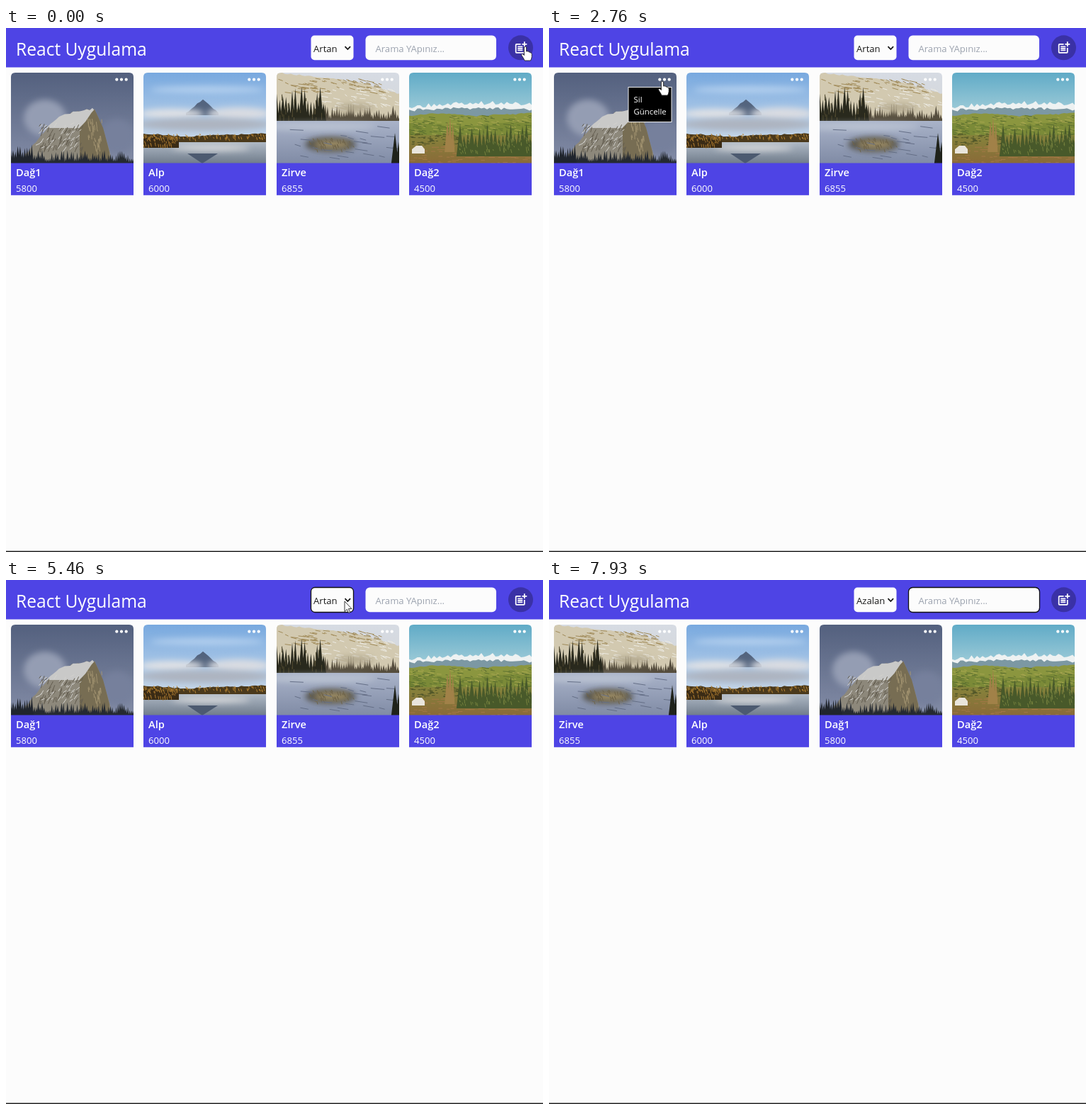
An HTML page for the animation above (8 s loop, 758 by 739 pixels).

```html
<!DOCTYPE html>
<html lang="tr">
<head>
<meta charset="utf-8">
<title>React Uygulama</title>
<style>
  html, body { margin: 0; width: 100%; height: 100%; overflow: hidden; background: #fcfcfc; }
  svg { display: block; width: 758px; height: 739px; }
  text { font: 13.1px "Open Sans", "Noto Sans", sans-serif; fill: #fff; }
  .h1 { font-size: 24.6px; }
  .h2 { font-size: 19.3px; }
  .name { font-size: 14.6px; font-weight: 600; }
  .small { font-size: 11.4px; }
  .dark { fill: #1a1a1a; }
  .hint { fill: #9ca3af; }
  .brand { fill: #4e44e5; }
  .ring { fill: none; stroke: #101010; stroke-width: 1.3; }
  .field { fill: #fcfcfc; stroke: #e5e7eb; }
  .cursor { fill: #fff; stroke: #222; stroke-width: .9; stroke-linejoin: round; }
</style>
</head>
<body>
<svg viewBox="0 0 758 739">
  <defs>
    <clipPath id="photo"><path d="M0 128V6Q0 0 6 0H167Q173 0 173 6V128Z"/></clipPath>
    <filter id="soft" x="-50%" y="-50%" width="200%" height="200%"><feGaussianBlur stdDeviation="7"/></filter>
    <filter id="haze" x="-50%" y="-90%" width="200%" height="280%"><feGaussianBlur stdDeviation="4"/></filter>
    <g id="menu">
      <rect x="105" y="20.5" width="61" height="49" stroke="#eee"/>
      <text class="small" x="112.500" y="41.500">Sil</text>
      <text class="small" x="112.500" y="59">Güncelle</text>
    </g>
  </defs>

  <rect width="758" height="55.500" class="brand"/>
  <rect y="737.500" width="758" height="1.500" fill="#222"/>
  <text class="h1" x="14" y="38.500">React Uygulama</text>

  <rect x="430.500" y="10.500" width="60" height="34.700" rx="5" fill="#fcfcfc"/>
  <text id="order" class="dark" x="434" y="33.500"></text>
  <path d="M478.500 26.200L482.300 30L486.100 26.200" fill="none" stroke="#111" stroke-width="1.700"/>
  <rect id="selectRing" class="ring" x="430.500" y="10.500" width="60" height="35" rx="5.500"/>

  <rect x="507.500" y="10.500" width="184.500" height="34.700" rx="6" fill="#fcfcfc"/>
  <text class="hint" x="521.500" y="33.500">Arama YApınız...</text>
  <rect id="searchRing" class="ring" x="507.500" y="10.500" width="185" height="35" rx="6"/>
  <rect id="caret" x="521" y="20" width="1" height="17" fill="#111"/>

  <circle cx="726.500" cy="27.800" r="17.500" fill="#3a31a6"/>
  <path transform="translate(716.2 17.600) scale(.867)" fill="#fff"
    d="M17 19H5V7h7V5H5q-2 0-2 2v12q0 2 2 2h12q2 0 2-2v-7h-2zM19 2h-2v3h-3v2h3v3h2V7h3V5h-3zM7 9h8v2H7zM7 12h8v2H7zM7 15h8v2H7z"/>

  <g id="cards"></g>

  <g id="modal">
    <rect x="254" y="258" width="249" height="250" rx="6" opacity=".13" filter="url(#soft)"/>
    <rect x="252" y="248" width="253.500" height="252" rx="6" fill="#fcfcfc"/>
    <text class="h2 dark" x="266.500" y="285">Ürün Oluştur</text>
    <path d="M473 268.500L489.500 285M489.500 268.500L473 285" stroke="#111" stroke-width="2.200"/>
    <path d="M266.500 301.500H491.500" stroke="#e5e7eb"/>
    <rect class="field" x="266.500" y="312.300" width="225" height="34.500" rx="5"/>
    <rect class="field" x="266.500" y="357.300" width="225" height="34.500" rx="5"/>
    <rect class="field" x="266.500" y="402.300" width="225" height="34.500" rx="5"/>
    <text class="hint" x="274" y="335.500">Ürün Ekle</text>
    <text class="hint" x="274" y="380.800">Fiyat Ekle</text>
    <rect x="274" y="410" width="75.500" height="25.500" rx="2" fill="#efefef" stroke="#767676"/>
    <text class="dark" x="280.500" y="428">Dosya Seç</text>
    <text class="dark" x="353.500" y="428">Dosya seçilmedi</text>
    <rect class="brand" x="266.500" y="450.700" width="225" height="34.700" rx="5"/>
    <text x="379" y="473.500" text-anchor="middle">Ürün Oluştur</text>
  </g>

  <path id="arrow" class="cursor" d="M0 0V14.500L3.300 11.400L5.600 16.400L7.700 15.500L5.500 10.600H10Z"/>
  <path id="hand" class="cursor" d="M-1.600 1Q0 -1 1.600 1V7Q5 6 5.200 8Q7 7.500 7.400 9Q9 9 9.200 10.500V14.500Q9 17 7.500 20H-1Q-2 17 -5 13Q-6 11 -4.500 10.500Q-3 10.500 -1.600 12.500Z"/>
</svg>

<script>
const $ = id => document.getElementById(id);

let seed = 7;
const rnd = () => (seed = seed * 16807 % 2147483647) / 2147483647;

// Vertical gradient from `y` down to the photo's lower edge
function fade(id, y, top, bottom) {
  return `<linearGradient id="${id}" x2="0" y2="1"><stop stop-color="${top}"/><stop offset="1" stop-color="${bottom}"/></linearGradient>
    <rect y="${y}" width="174" height="${128 - y}" fill="url(#${id})"/>`;
}

const blob = (x, y, rx, ry, fill) =>
  `<ellipse cx="${x}" cy="${y}" rx="${rx}" ry="${ry}" fill="${fill}" filter="url(#haze)"/>`;

// Jagged skyline through a few points, filled down to `base`
function ridge(keys, rough, base, fill) {
  let d = `M${keys[0][0]} ${base}`;
  keys.forEach(([x, y], i) => {
    const [toX, toY] = keys[i + 1] || [x, y];
    const n = Math.max(1, Math.round((toX - x) / 4));
    for (let k = 0; k < n; k++) {
      const u = k / n;
      d += `L${x + (toX - x) * u} ${y + (toY - y) * u + (rnd() - .5) * rough}`;
    }
  });
  return `<path d="${d}V${base}Z" fill="${fill}"/>`;
}

// Row of pointed trees standing on `base`
function trees(from, to, base, low, high, width, fill) {
  let d = '';
  for (let x = from; x < to; x += width * .55) {
    const h = low + rnd() * (high - low), w = width * (.7 + rnd() * .5);
    d += `M${x - w / 2} ${base}L${x} ${base - h}L${x + w / 2} ${base}Z`;
  }
  return `<path d="${d}" fill="${fill}"/>`;
}

// Scattered short strokes for rock, grass and snow
function flecks(n, x, y, w, h, dx, dy, color) {
  let d = '';
  for (let i = 0; i < n; i++) d += `M${x + rnd() * w} ${y + rnd() * h}l${dx * (.4 + rnd())} ${dy * (.4 + rnd())}`;
  return `<path d="${d}" stroke="${color}"/>`;
}

const rock = () => fade('dusk', 0, '#53607e', '#838ca6')
  + blob(48, 64, 30, 26, '#949db3') + blob(150, 90, 24, 24, '#76809c')
  + ridge([[20, 116], [58, 70], [90, 55], [118, 51], [131, 80], [141, 118]], 3, 128, '#8d887b')
  + ridge([[48, 80], [72, 59], [115, 51], [118, 54]], 3, 78, '#c9c9c8')
  + ridge([[97, 78], [118, 52], [130, 78], [139, 112]], 3, 128, '#776d53')
  + flecks(60, 42, 72, 60, 34, -3, 7, '#635d50')
  + flecks(40, 40, 70, 62, 36, -4, 5, '#d3d2ce')
  + flecks(30, 104, 64, 24, 44, 1, 8, '#a39471')
  + trees(0, 174, 129, 7, 20, 5, '#252a31') + trees(3, 32, 129, 14, 30, 6, '#20252d');

const lake = () => fade('noon', 0, '#78a9df', '#e2e8ee')
  + blob(90, 24, 80, 5, '#b2cfee')
  + ridge([[60, 57], [84, 37], [106, 57]], 2, 60, '#53647e')
  + blob(40, 58, 45, 7, '#dfe1e5') + blob(135, 58, 45, 9, '#d9dce2')
  + blob(86, 73, 95, 9, '#adb4c0')
  + fade('pond', 96, '#b3bdc9', '#707c8b')
  + blob(95, 106, 55, 4, '#d9dadb')
  + ridge([[0, 86], [60, 90], [110, 88], [174, 86]], 2, 98, '#4a391c')
  + ridge([[0, 90], [50, 97]], 4, 106, '#3a2b15')
  + flecks(90, 0, 86, 174, 7, 1, 3, '#b78432') + flecks(50, 0, 88, 48, 14, 1, 4, '#a8772e')
  + '<path d="M62 114H105L83 128Z" fill="#4c5a70"/>';

const ice = () => fade('pale', 0, '#d6dbe3', '#d4d3cf')
  + ridge([[0, 0], [60, 6], [120, 14], [174, 30]], 2, 70, '#d2c9b0')
  + flecks(70, 0, 8, 150, 20, 8, 2, '#a08a58') + flecks(60, 60, 22, 114, 30, 7, 2, '#eceae2')
  + trees(62, 180, 70, 10, 27, 6, '#554d3d') + blob(110, 50, 28, 6, '#b3a98f')
  + trees(0, 68, 72, 28, 53, 8, '#29291d')
  + flecks(24, 2, 30, 62, 36, 0, 8, '#514a30')
  + fade('frost', 68, '#a9b3c9', '#808ba5')
  + blob(60, 76, 80, 5, '#bcc4d3')
  + blob(76, 101, 36, 10, '#4d4b43') + blob(78, 101, 26, 6, '#a08f66')
  + flecks(40, 46, 92, 62, 16, 2, 5, '#6e6349') + flecks(24, 0, 74, 165, 50, 14, 2, '#646e86')
  + trees(167, 182, 130, 30, 55, 9, '#1f221a');

const valley = () => fade('clear', 0, '#60abc7', '#f0f5ee')
  + ridge([[0, 48], [86, 42], [174, 44]], 6, 70, '#eef2f2')
  + ridge([[0, 53], [86, 50], [174, 52]], 4, 70, '#7c98a3')
  + ridge([[0, 61], [45, 57], [95, 61], [174, 57]], 2, 128, '#8b963f')
  + ridge([[0, 70], [70, 76], [174, 68]], 3, 128, '#7b8a38')
  + flecks(120, 0, 60, 170, 28, 7, 1, '#5d7030') + flecks(80, 0, 62, 170, 30, 7, 1, '#a7a650')
  + fade('field', 88, '#85833b', '#8a6a38')
  + flecks(70, 0, 86, 70, 16, 4, 0, '#4f5528') + flecks(70, 0, 104, 170, 24, 8, 0, '#a37746')
  + trees(72, 180, 118, 24, 46, 10, '#48592a') + flecks(90, 70, 84, 104, 28, 1, 5, '#75803d')
  + trees(54, 64, 112, 38, 58, 7, '#a18148')
  + '<path d="M4 114V108L10 103H18L22 108V114Z" fill="#e9e5dc"/>';

const cards = [['Dağ1', 5800, rock], ['Alp', 6000, lake], ['Zirve', 6855, ice], ['Dağ2', 4500, valley]];
$('cards').innerHTML = cards.map(([name, price, photo], i) => `<g id="card${i}">
  <g clip-path="url(#photo)">${photo()}</g>
  <rect class="brand" y="127.500" width="173" height="45.300"/>
  <text class="name" x="7" y="145.500">${name}</text>
  <text x="7" y="168">${price}</text>
  ${[0, 1, 2].map(k => `<circle cx="${149.3 + k * 6.7}" cy="9.700" r="2.100" fill="#fff"/>`).join('')}
  <use id="menu${i}" href="#menu"/></g>`).join('');

// Pointer moves: start, end, x, y, easing
const smooth = u => u * u * (3 - 2 * u);
const rush = u => 1 - (1 - u) ** 5;
const moves = [
  [960, 1560, 479, 278, rush],
  [1730, 1760, 481, 276, smooth],
  [1960, 2600, 160, 75, smooth],
  [3460, 4060, 354, 77, smooth],
  [4630, 4700, 356, 75, smooth],
  [4860, 5260, 478, 30, smooth],
  [5460, 5700, 461, 48, smooth],
  [6160, 6160, 457, 82, smooth],
  [6730, 7060, 560, 28, smooth]
];

function pointer(t) {
  let x = 733, y = 26;
  for (const [a, b, toX, toY, ease] of moves) {
    if (t < a) break;
    const u = b > a ? ease(Math.min(1, (t - a) / (b - a))) : 1;
    x += (toX - x) * u;
    y += (toY - y) * u;
  }
  return [x, y];
}

const cardX = slot => 7 + Math.round(slot * 187.3);
const during = (t, a, b) => t >= a && t < b;
const show = (id, on) => $(id).style.display = on ? '' : 'none';

function draw(t) {
  const falling = t >= 6160;
  const slots = falling ? [2, 1, 0, 3] : [0, 1, 2, 3];
  const modal = during(t, 360, 1930);
  const openMenu = during(t, 2760, 3460) ? 0 : during(t, 4230, 4400) ? 1 : -1;
  slots.forEach((slot, i) => {
    $('card' + i).setAttribute('transform', `translate(${cardX(slot)} 63)`);
    show('menu' + i, i === openMenu);
  });
  $('order').textContent = falling ? 'Azalan' : 'Artan';
  show('modal', modal);
  show('selectRing', during(t, 5260, 7360));
  show('searchRing', t >= 7360);
  show('caret', during(t, 7360, 7860));

  // The hand appears over the add button, the card dots and the modal's close mark
  const [x, y] = pointer(t);
  const spots = [[726, 28], ...slots.map(slot => [cardX(slot) + 156, 73])];
  if (modal) spots.push([481, 277]);
  const hand = spots.some(([sx, sy]) => Math.hypot(x - sx, y - sy) < 17);
  show('hand', hand);
  show('arrow', !hand && !(falling && x > 507));
  for (const id of ['hand', 'arrow']) $(id).setAttribute('transform', `translate(${x} ${y})`);
}

const start = performance.now();
function tick() {
  draw((performance.now() - start) % 8000);
  requestAnimationFrame(tick);
}
tick();
</script>
</body>
</html>
```
